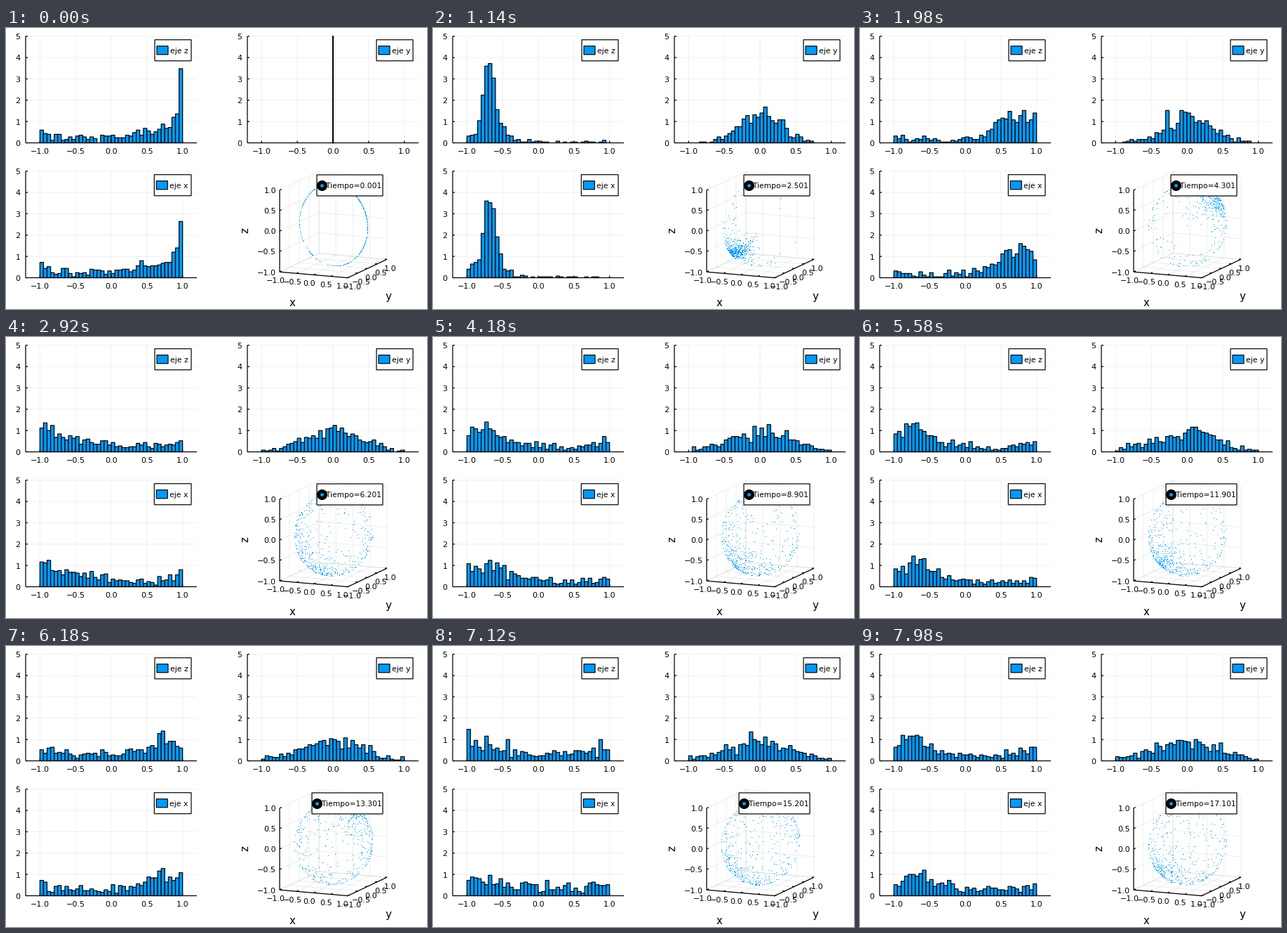
Recreate the animation shown at these times as a matplotlib script. Size 600x400 px, loop 8 s.

```python
import numpy as np
import matplotlib.pyplot as plt
from matplotlib.animation import FuncAnimation
from matplotlib.collections import LineCollection, PolyCollection
from matplotlib.patches import Rectangle

W, H, DPI = 600, 400, 100
PT = 72 / DPI
BLUE = "#009afa"
TICKS = np.linspace(-1, 1, 5)
STEPS, COUNT = 172, 500

plt.rcParams["font.family"] = "DejaVu Sans"
fig = plt.figure(figsize=(W / DPI, H / DPI), dpi=DPI, facecolor="white")
ax = fig.add_axes([0, 0, 1, 1])
ax.set_xlim(0, W)
ax.set_ylim(H, 0)
ax.axis("off")


# ---- drawing helpers (pixel coordinates, y downwards) ----
def lines(segs, color="black", width=1.25, alpha=1.0, z=3):
    ax.add_collection(LineCollection(segs, colors=color, linewidths=width * PT,
                                     alpha=alpha, zorder=z, snap=False),
                      autolim=False)


def label(x, y, s, ha="center", size=11.1, z=5, **kw):
    """Text whose digits are centred on y."""
    return ax.text(x, y + 0.366 * size, s, ha=ha, va="baseline",
                   fontsize=size * PT, zorder=z, **kw)


def box(x, y, w, h, color, z):
    return ax.add_patch(Rectangle((x, y), w, h, fc=color, ec="black",
                                  lw=1.2 * PT, zorder=z, snap=False))


def num(v):
    return f"{v:.1f}".replace("-", "\u2212")


# ---- histogram panels ----
XS, YS = 101.67, 30.35


class Panel:
    def __init__(self, cx, base, name, dx=0):
        self.cx, self.base = cx, base
        left, right, top = cx - 122, cx + 122, base - 5 * YS
        xt = cx + XS * TICKS
        yt = base - YS * np.arange(6)
        lines([[(x, top), (x, base)] for x in xt]
              + [[(left, y), (right, y)] for y in yt],
              width=1, alpha=0.06, z=1)
        lines([[(left, top), (left, base)], [(left, base), (right, base)]]
              + [[(x, base), (x, base - 3)] for x in xt]
              + [[(left, y), (left + 3, y)] for y in yt])
        for x, v in zip(xt, TICKS):
            label(x, base + 11.6, num(v))
        for v, y in enumerate(yt):
            label(left - 7.5, y + 0.3, str(v), "right")
        lx = right - 60 + dx
        box(lx, top + 5, right - 8 - lx, 30, "white", 6)
        box(lx + 3, top + 14, 16, 12, BLUE, 7)
        label(lx + 21.7, top + 20.3, "eje " + name, "left", 10.9, 7)
        self.bars = PolyCollection([], facecolors=BLUE, edgecolors="black",
                                   linewidths=1.2 * PT, zorder=2, snap=False)
        ax.add_collection(self.bars, autolim=False)

    def show(self, data):
        step = bin_width(np.ptp(data))
        lo = np.floor(data.min() / step)
        n = int(np.ceil(data.max() / step) - lo) + 1
        edges = (lo + np.arange(n + 1)) * step
        count, _ = np.histogram(data, edges)
        tall = np.minimum(count / (COUNT * step), 5)
        keep = tall > 0
        x0 = self.cx + XS * edges[:-1][keep]
        x1 = self.cx + XS * edges[1:][keep]
        y1 = self.base - YS * tall[keep]
        y0 = np.full_like(y1, self.base)
        self.bars.set_verts(np.stack([np.column_stack([x0, x0, x1, x1]),
                                      np.column_stack([y0, y1, y1, y0])], 2))


def bin_width(span):
    """Round step giving about 40 bins."""
    raw = span / 40
    unit = 10 ** np.floor(np.log10(raw))
    for m in (1, 2, 5):
        if raw / unit <= 1.1 * m:
            return m * unit
    return 10 * unit


panel_z = Panel(150, 163.5, "z")
panel_y = Panel(466, 163.5, "y")
panel_x = Panel(150, 355.5, "x", -0.7)

# ---- 3D panel, parallel projection ----
CENTER = np.array([466.5, 280.0])
AXES = np.array([[48.5, 4.2], [28.0, -13.2], [0.0, -58.2]])


def project(p):
    return CENTER + np.asarray(p, float) @ AXES


def edge(a, b):
    return [tuple(project(a)), tuple(project(b))]


def tick(p, along, size=3):
    p = project(p)
    return [tuple(p), tuple(p + size * along / np.hypot(*along))]


grid, marks = [], []
for v in TICKS:
    grid += [edge((v, -1, -1), (v, 1, -1)), edge((-1, v, -1), (1, v, -1)),
             edge((-1, v, -1), (-1, v, 1)), edge((-1, -1, v), (-1, 1, v)),
             edge((v, 1, -1), (v, 1, 1)), edge((-1, 1, v), (1, 1, v))]
    marks += [tick((v, -1, -1), AXES[1]), tick((1, v, -1), -AXES[0]),
              tick((-1, -1, v), AXES[1])]
    label(432 + 48 * v, 363 + 4 * v, num(v))
    label(520.3 + 27 * v, 354.5 - 13 * v, num(v))
    label(385, project((-1, -1, v))[1] + 0.3, num(v), "right")
lines(grid, width=1, alpha=0.07, z=1)
lines(marks + [edge((-1, -1, -1), (-1, -1, 1)), edge((-1, -1, -1), (1, -1, -1)),
               edge((1, -1, -1), (1, 1, -1))])
label(407.5, 391, "x", size=15)
label(545, 382, "y", size=15)
ax.text(341, 288.5, "z", rotation=90, ha="center", va="center",
        fontsize=15 * PT, zorder=5)

dots, = ax.plot([], [], "s", ms=1.0 * PT, mfc=BLUE, mec="none", zorder=4)
frame_box = box(443, 209, 94, 30, "white", 6)
ring, = ax.plot([], [], "o", ms=15 * PT, mfc="black", mec="none", zorder=7)
core, = ax.plot([], [], "o", ms=5 * PT, mfc=BLUE, mec="none", zorder=8)
clock = label(456.5, 224.3, "", "left", size=10.6, z=8)

# ---- swarm on the unit sphere, swinging along the x = z diagonal ----
POLE = np.array([1, 0, 1]) / np.sqrt(2)
SIDE = np.array([1, 0, -1]) / np.sqrt(2)
SWING = np.array([(0, .45), (.8, .5), (2.4, -.91), (4.05, .7), (5.65, -.68),
                  (7.2, .6), (8.65, -.45), (10.05, .36), (11.7, -.48),
                  (13.1, .3), (14.7, -.42), (16, .35), (17.3, -.33)])
DIFFUSION, AXIS_PULL, FLATTEN = 0.019, 0.04, 0.03


def swing(t):
    """Mean position along the pole, eased between turning points."""
    i = np.searchsorted(SWING[:, 0], t, side="right") - 1
    (t0, a), (t1, b) = SWING[i], SWING[i + 1]
    return a + (b - a) * (1 - np.cos(np.pi * (t - t0) / (t1 - t0))) / 2


def unit(m):
    return m / np.linalg.norm(m, axis=1, keepdims=True)


def steer(m, mean):
    """Turn the swarm about the y axis until its mean along the pole fits."""
    p, q = m @ POLE, m @ SIDE
    r, phi = np.hypot(p, q), np.arctan2(q, p)
    for _ in range(4):
        gap = mean - (r * np.cos(phi)).mean()
        phi = phi - gap / (r * np.sin(phi) ** 2).mean() * np.sin(phi)
    out = np.outer(r * np.cos(phi), POLE) + np.outer(r * np.sin(phi), SIDE)
    out[:, 1] = m[:, 1]
    return out


def simulate(dt=0.1):
    rng = np.random.default_rng(12)
    ang = rng.vonmises(np.radians(43), 1.0, COUNT)
    m = unit(np.column_stack([np.sin(ang), 3e-4 * rng.standard_normal(COUNT),
                              np.cos(ang)]))
    states = [m]
    for k in range(1, STEPS):
        push = AXIS_PULL * (m @ POLE)[:, None] * POLE
        push[:, 1] -= FLATTEN * m[:, 1]
        kick = np.sqrt(2 * DIFFUSION * dt) * rng.standard_normal(m.shape)
        move = push * dt + kick
        m = unit(m + move - (move * m).sum(1, keepdims=True) * m)
        m = steer(m, swing(k * dt))
        states.append(m)
    return states


STATES = simulate()


def step_at(i):
    """Steps last 20, 100 and 20 ms in turn; one tick is 20 ms."""
    q, r = divmod(i, 7)
    return 3 * q + (0 if r == 0 else 1 if r < 6 else 2)


def update(i):
    k = step_at(i)
    m = STATES[k]
    panel_x.show(m[:, 0])
    panel_y.show(m[:, 1])
    panel_z.show(m[:, 2])
    dots.set_data(*project(m).T)
    shift = 7 if k >= 100 else 0
    frame_box.set_x(443 - shift)
    frame_box.set_width(94 + shift)
    for part in (ring, core):
        part.set_data([450 - shift], [224])
    clock.set_x(456.5 - shift)
    clock.set_text(f"Tiempo={k / 10 + 0.001:.3f}")
    return ()


anim = FuncAnimation(fig, update, frames=400, interval=20, repeat=True,
                     repeat_delay=0, init_func=lambda: update(0))
plt.show()
```
